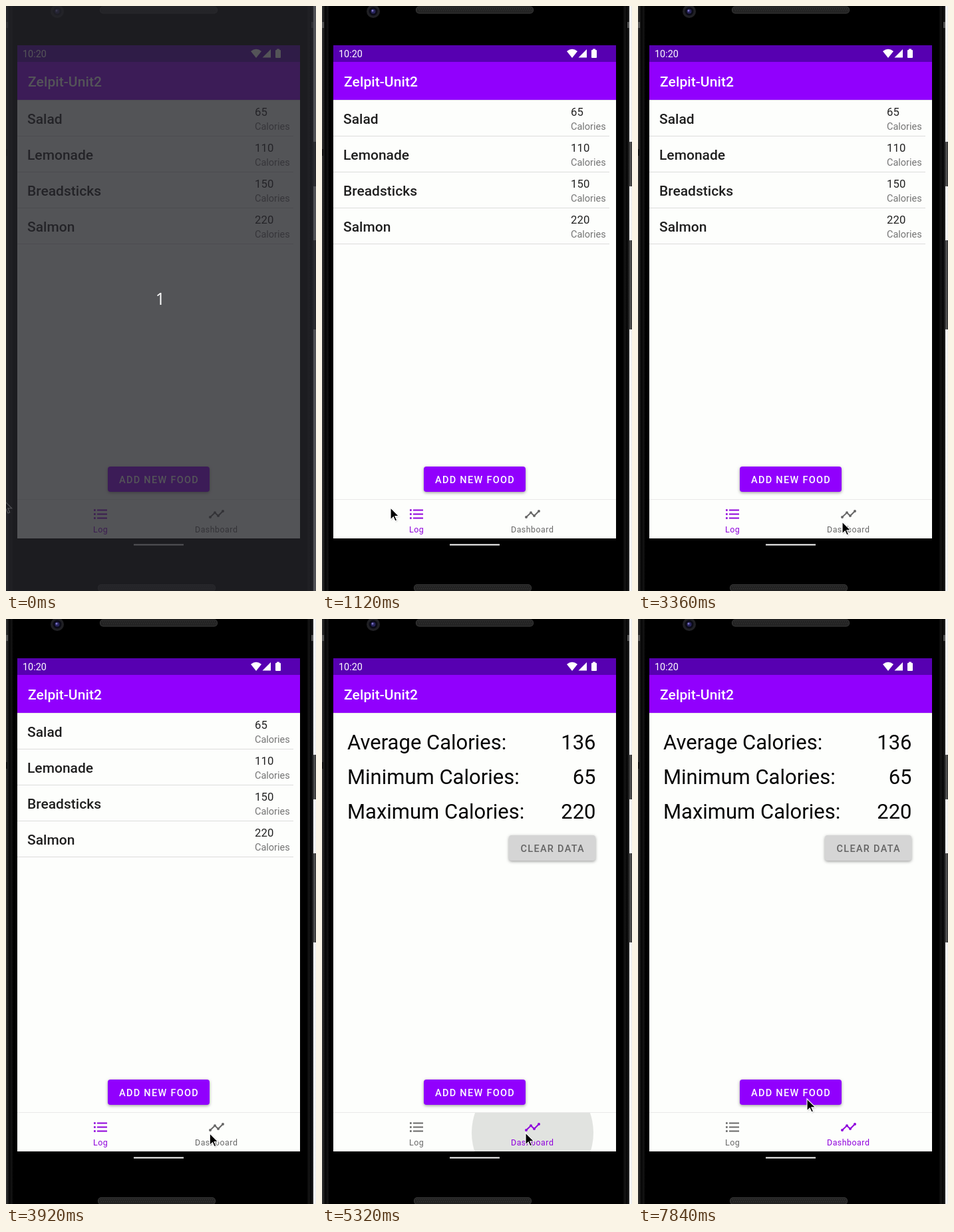
Animation of 466x879 px, one loop 8 s. Source, as an HTML page with a canvas:

```html
<!DOCTYPE html>
<html lang="en">
<head>
<meta charset="utf-8">
<title>Calorie log</title>
<style>
html, body { margin: 0; width: 100%; height: 100%; overflow: hidden; background: #000; }
canvas { display: block; width: 466px; height: 879px; }
</style>
</head>
<body>
<canvas id="stage" width="466" height="879"></canvas>
<script>
const ctx = document.getElementById('stage').getContext('2d');
const LOOP = 8000, STEP = 280;
const PURPLE = '#9100fd', ACCENT = '#8f00dc', GREY = '#686868', PAPER = '#fdfefc';
const FOODS = [['Salad', 65], ['Lemonade', 110], ['Breadsticks', 150], ['Salmon', 220]];
const STATS = [['Average', 136], ['Minimum', 65], ['Maximum', 220]];

// Cursor stops: time, x, y
const PATH = [
  [0, -4, 742], [560, -4, 742], [1960, 300, 776], [2240, 303, 775],
  [3360, 307, 775], [4200, 306, 772], [6720, 306, 772], [7840, 254, 721], [8000, 254, 721]
];

function rect(x, y, w, h, color) {
  ctx.fillStyle = color;
  ctx.fillRect(x, y, w, h);
}

function round(x, y, w, h, r, color) {
  ctx.beginPath();
  ctx.roundRect(x, y, w, h, r);
  ctx.fillStyle = color;
  ctx.fill();
}

function dot(x, y, r, color) {
  ctx.beginPath();
  ctx.arc(x, y, r, 0, Math.PI * 2);
  ctx.fillStyle = color;
  ctx.fill();
}

function poly(points, color) {
  ctx.beginPath();
  points.forEach(([x, y]) => ctx.lineTo(x, y));
  ctx.closePath();
  ctx.fillStyle = color;
  ctx.fill();
}

function text(str, x, y, size, color, { weight = 400, gap = 0, align = 'left', font = 'Roboto' } = {}) {
  ctx.font = `${weight} ${size}px ${font}, sans-serif`;
  ctx.letterSpacing = gap + 'px';
  ctx.textAlign = align;
  ctx.fillStyle = color;
  ctx.fillText(str, x, y);
}

function blend(x0, x1, stops) {
  const g = ctx.createLinearGradient(x0, 0, x1, 0);
  stops.forEach((c, i) => g.addColorStop(i / (stops.length - 1), c));
  return g;
}

function speaker(x, y) {
  round(x, y, 177, 11, 5, '#3a3a3a');
  round(x + 1, y + 1, 175, 9, 4, '#232323');
  for (let i = 4; i < 174; i += 3) {
    rect(x + i, y + 3, 1, 1, '#3c3c3c');
    rect(x + i + 1, y + 6, 1, 1, '#3c3c3c');
  }
}

function sideButton(y, h) {
  round(461, y, 7, h, 2, blend(461, 466, ['#1a1a1a', '#565656', '#303030']));
}

function phone() {
  rect(0, 0, 466, 879, '#000');
  rect(0, 0, 11, 879, blend(0, 11, ['#383838', '#1c1c1c', '#050505', '#151515', '#000']));
  rect(452, 0, 10, 879, blend(452, 462, ['#000', '#151515', '#050505', '#2b2b2b']));
  rect(462, 0, 4, 879, '#f1f1f1');
  rect(0, 24, 3, 9, '#555');
  rect(459, 24, 3, 9, '#555');
  rect(0, 215, 2, 10, '#111');
  sideButton(204, 67);
  sideButton(352, 134);
  speaker(141, 0.5);
  speaker(138, 869);
  dot(77, 8, 10, '#202024');
  dot(77, 8, 6.5, '#0b0b16');
  dot(77, 8, 3.5, '#28245c');
  dot(76, 7, 1.5, '#7f78c8');
  rect(192, 808.5, 75, 2, '#fff');
}

function statusBar() {
  rect(17, 59, 425, 25, '#5700b1');
  text('10:20', 25, 77, 14.4, '#fff');
  ctx.beginPath();
  ctx.moveTo(376, 78);
  ctx.lineTo(368, 68);
  ctx.quadraticCurveTo(376, 61.5, 384, 68);
  ctx.closePath();
  ctx.fillStyle = '#fff';
  ctx.fill();
  poly([[385.5, 77.5], [398, 77.5], [398, 65]], '#fff');
  round(405, 66, 8, 12, 1, '#fff');
  rect(407, 64.5, 4, 2, '#fff');
}

function raisedButton(label, x, y, w, textX, fill, ink) {
  ctx.save();
  ctx.shadowColor = 'rgba(0,0,0,.38)';
  ctx.shadowBlur = 4;
  ctx.shadowOffsetY = 1.5;
  round(x, y, w, 38, 4, fill);
  ctx.restore();
  text(label, textX, y + 25, 14.5, ink, { weight: 500, gap: 1.29 });
}

function logPage() {
  FOODS.forEach(([name, cal], i) => {
    const y = 141 + i * 54;
    text(name, 32, y + 36, 21, '#1f1f1f', { weight: 500 });
    text(cal, 374, y + 24, 16.7, '#222', { gap: 0.15 });
    text('Calories', 374, y + 45, 14.5, '#757575');
    rect(17, y + 54, 415, 1, '#dcdcdc');
  });
}

function statsPage() {
  STATS.forEach(([name, value], i) => {
    const y = 196 + i * 52;
    text(name + ' Calories:', 38, y, 31, '#050505');
    text(value, 411.5, y, 31, '#050505', { align: 'right' });
  });
  raisedButton('CLEAR DATA', 281, 325, 130, 298.5, '#d5d5d5', '#646464');
}

function ripple(time) {
  if (time < 4200 || time >= 5880) return;
  ctx.save();
  ctx.beginPath();
  ctx.rect(17, 742, 425, 58);
  ctx.clip();
  if (time < 4460) {
    const g = ctx.createRadialGradient(311, 772, 5, 313, 772, 88);
    g.addColorStop(0, '#b4b6b4');
    g.addColorStop(0.5, '#c3c5c3');
    g.addColorStop(0.8, '#dfe1de');
    g.addColorStop(1, PAPER);
    dot(313, 772, 88, g);
  } else {
    dot(316.5, 772, 91.5, '#e1e3e0');
  }
  ctx.restore();
}

function navBar(time, onStats) {
  rect(17, 741, 425, 1, '#e9e9e9');
  ripple(time);
  const left = onStats ? GREY : ACCENT, right = onStats ? ACCENT : GREY;
  for (let i = 0; i < 3; i++) {
    const y = 756.5 + i * 6;
    rect(132, y - 0.3, 2.7, 2.6, left);
    rect(137, y, 15, 2, left);
  }
  const line = [[307, 768], [314, 761.3], [319, 766], [326, 759]];
  ctx.beginPath();
  line.forEach(([x, y]) => ctx.lineTo(x, y));
  ctx.strokeStyle = right;
  ctx.lineWidth = 2;
  ctx.stroke();
  line.forEach(([x, y]) => dot(x, y, 2, right));
  text('Log', 131, 790.5, 12.4, left, { gap: 0.5 });
  text('Dashboard', 284, 790.5, 12.4, right, { gap: 0.5 });
}

function cursor(time) {
  const i = Math.max(1, PATH.findIndex(p => p[0] > time));
  const [t0, x0, y0] = PATH[i - 1], [t1, x1, y1] = PATH[i];
  const u = (time - t0) / (t1 - t0);
  const k = u * u * (3 - 2 * u);
  ctx.save();
  ctx.translate(x0 + (x1 - x0) * k, y0 + (y1 - y0) * k);
  ctx.scale(1.05, 1.05);
  ctx.shadowColor = 'rgba(0,0,0,.25)';
  ctx.shadowBlur = 2;
  ctx.shadowOffsetX = 1;
  ctx.shadowOffsetY = 1;
  poly([[0, 0], [0, 17], [4, 13.2], [6.6, 19], [9.2, 18], [6.6, 12.1], [12, 12.1]], '#000');
  ctx.shadowColor = 'transparent';
  ctx.strokeStyle = '#fff';
  ctx.lineWidth = 1.1;
  ctx.stroke();
  ctx.restore();
}

function draw(time) {
  const onStats = time >= 4200;
  phone();
  rect(17, 59, 425, 741, PAPER);
  statusBar();
  rect(17, 84, 425, 57, PURPLE);
  rect(17, 141, 425, 1, '#e4e0e8');
  text('Zelpit-Unit2', 33, 121, 21, '#fff', { weight: 500, gap: 0.1 });
  if (onStats) statsPage(); else logPage();
  raisedButton('ADD NEW FOOD', 153, 692, 153, 170, PURPLE, '#fff');
  navBar(time, onStats);
  cursor(Math.floor(time / STEP) * STEP);
  if (time < 20) {
    rect(0, 0, 466, 879, 'rgba(37,36,41,.78)');
    text('1', 232, 449, 25, '#fff', { align: 'center', font: '"Open Sans"' });
  }
}

const start = performance.now();
function tick() {
  draw((performance.now() - start) % LOOP);
  requestAnimationFrame(tick);
}
tick();
</script>
</body>
</html>
```
